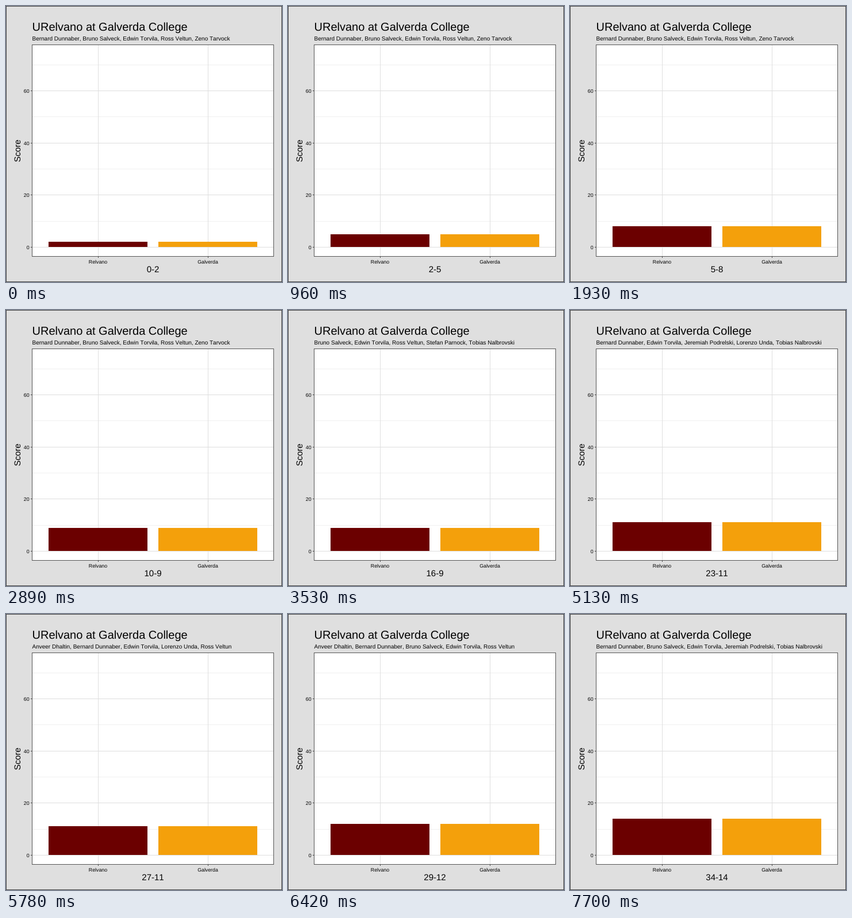
Animation, 480 px wide and 480 px high, one loop 8000 ms. Source, as an HTML page:

```html
<!DOCTYPE html>
<html lang="en">
<head>
<meta charset="utf-8">
<title>Score by team</title>
<style>
html, body { margin: 0; height: 100%; overflow: hidden; background: #dfdfdf; }
svg { display: block; width: 100vw; height: 100vh; }
text { font-family: "Liberation Sans", Arial, sans-serif; font-kerning: none; text-rendering: geometricPrecision; }
.title { font-size: 20px; }
.lineup { font-size: 10px; }
.axis { font-size: 15px; text-anchor: middle; }
.tick { font-size: 8.8px; text-anchor: middle; }
.right { text-anchor: end; }
line { shape-rendering: crispEdges; }
.major { stroke: #dedede; }
.minor { stroke: #f0f0f0; }
.mark { stroke: #444; }
.frame { fill: none; stroke: #555; }
</style>
</head>
<body>
<svg viewBox="0 0 480 480">
  <rect x=".5" y=".5" width="479" height="479" fill="#dfdfdf" stroke="#444"/>
  <rect x="45" y="67" width="421" height="369" fill="#fff"/>
  <g id="grid"></g>
  <rect id="left" x="74" width="172" fill="#6b0000"/>
  <rect id="right" x="265" width="172" fill="#f4a00b"/>
  <rect class="frame" x="45.5" y="67.5" width="420" height="368"/>
  <text class="title" x="45.5" y="43">URelvano at Galverda College</text>
  <text class="lineup" id="lineup" x="45.5" y="60"></text>
  <text class="tick" x="160" y="448">Relvano</text>
  <text class="tick" x="351" y="448">Galverda</text>
  <text class="axis" id="score" x="255.5" y="463"></text>
  <text class="axis" transform="translate(25 252) rotate(-90)">Score</text>
</svg>
<script>
const LOOP = 8000, BASE = 419;
const $ = id => document.getElementById(id);
const yOf = v => 419.3 - 4.53 * v;

const players = {
  A: "Anveer Dhaltin", B: "Bernard Dunnaber", H: "Bruno Salveck", E: "Edwin Torvila",
  J: "Jeremiah Podrelski", L: "Lorenzo Unda", R: "Ross Veltun", S: "Stefan Parnock",
  T: "Tobias Nalbrovski", Z: "Zeno Tarvock"
};

// start time, visitors, hosts, players on court (kept when omitted)
const plays = [
  [0, 0, 2, "BHERZ"], [160, 0, 3], [640, 0, 5], [960, 2, 5], [1280, 2, 7],
  [1600, 5, 7], [1930, 5, 8], [2250, 5, 9], [2570, 8, 9], [2890, 10, 9],
  [3210, 13, 9], [3530, 16, 9, "HERST"], [3850, 17, 9], [4170, 17, 11, "HJRST"],
  [4490, 20, 11], [4810, 22, 11, "BEJLT"], [5130, 23, 11], [5450, 25, 11, "BELRZ"],
  [5780, 27, 11, "ABELR"], [6100, 27, 12], [6420, 29, 12, "ABHER"], [6740, 29, 14],
  [7060, 30, 14, "BHEJR"], [7380, 32, 14], [7700, 34, 14, "BHEJT"]
];
plays.forEach((p, i) => p[3] ??= plays[i - 1][3]);

const line = (cls, x1, y1, x2, y2) =>
  `<line class="${cls}" x1="${x1}" y1="${y1}" x2="${x2}" y2="${y2}"/>`;

function drawGrid() {
  let minor = "", major = "";
  for (let v = 0; v <= 70; v += 10) {
    const y = Math.floor(yOf(v)) + .5;
    if (v % 20) {
      minor += line("minor", 46, y, 465, y);
    } else {
      major += line("major", 46, y, 465, y) + line("mark", 43, y, 45, y) +
        `<text class="tick right" x="40.6" y="${y + 3.6}">${v}</text>`;
    }
  }
  for (const x of [160.5, 351.5]) {
    major += line("major", x, 68, x, 435) + line("mark", x, 436, x, 438);
  }
  $("grid").innerHTML = minor + major;
}

let shown;
function draw(now) {
  const t = now % LOOP;
  const play = plays.findLast(p => p[0] <= t);
  if (play !== shown) {
    shown = play;
    const [, away, home, lineup] = play;
    const top = Math.round(yOf(home));
    for (const id of ["left", "right"]) {
      $(id).setAttribute("y", top);
      $(id).setAttribute("height", BASE - top);
    }
    $("score").textContent = `${away}-${home}`;
    $("lineup").textContent = [...lineup].map(k => players[k]).join(", ");
  }
  requestAnimationFrame(draw);
}

drawGrid();
draw(0);
</script>
</body>
</html>
```
